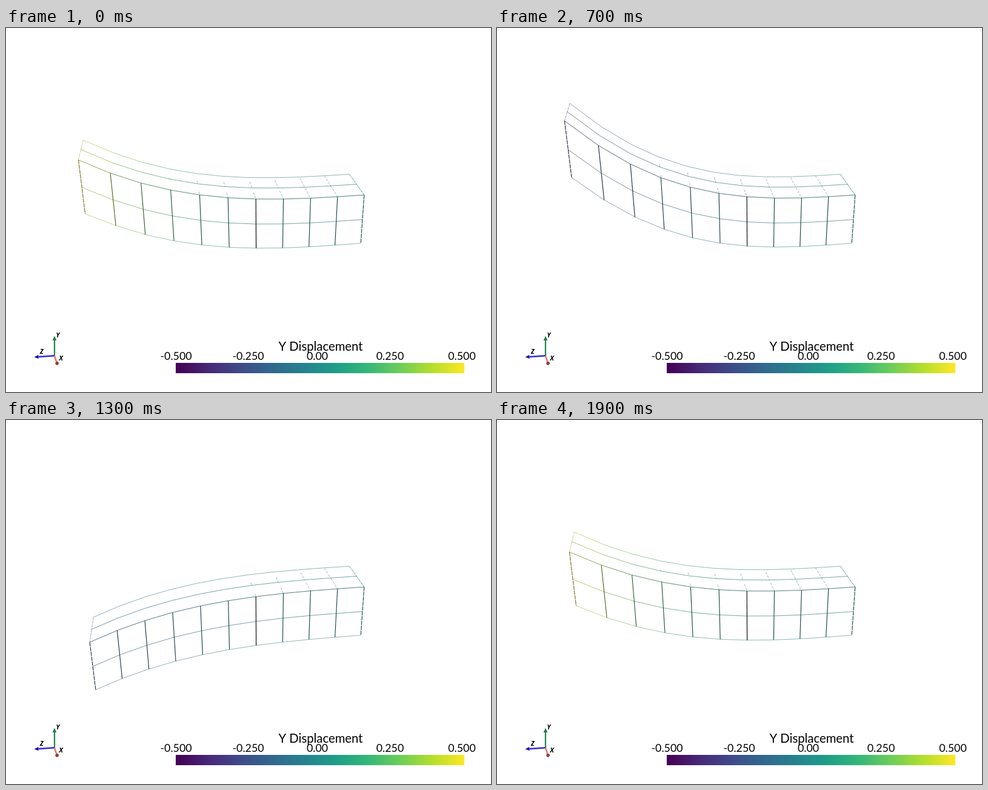
These frames come from a looping animation (800x600 px, 2000 ms). An HTML page with a canvas:

```html
<!DOCTYPE html>
<html lang="en">
<head>
<meta charset="utf-8">
<title>Beam displacement</title>
<style>
  html, body { margin: 0; width: 100%; height: 100%; overflow: hidden; background: #fff; }
  canvas { display: block; }
</style>
</head>
<body>
<canvas id="stage" width="800" height="600"></canvas>
<script>
const ctx = document.getElementById('stage').getContext('2d');
const STEPS = 20, STEP_MS = 100;
const CELLS = 10, LENGTH = 5;

// Camera: perspective with a 30 degree vertical view angle
const EYE = [11.915126, 6.113928, 3.612496];
const FOCUS = [0, 0.375, 2];
const FOCAL = 300 / Math.tan(Math.PI / 12);
const sub = (a, b) => a.map((v, i) => v - b[i]);
const dot = (a, b) => a[0] * b[0] + a[1] * b[1] + a[2] * b[2];
const cross = (a, b) => [
  a[1] * b[2] - a[2] * b[1],
  a[2] * b[0] - a[0] * b[2],
  a[0] * b[1] - a[1] * b[0]
];
const unit = a => a.map(v => v / Math.hypot(...a));
const forward = unit(sub(FOCUS, EYE));
const right = unit(cross(forward, [-0.425464, 0.902424, -0.067898]));
const up = cross(right, forward);

function project(p) {
  const r = sub(p, EYE), s = FOCAL / dot(r, forward);
  return [400 + dot(r, right) * s, 300 - dot(r, up) * s];
}

const VIRIDIS = [
  [68, 1, 84], [72, 40, 120], [62, 74, 137], [49, 104, 142], [38, 130, 142],
  [31, 158, 137], [53, 183, 121], [109, 205, 89], [180, 222, 44], [253, 231, 37]
];

// u runs from 0 to 1; shade below 1 darkens towards black
function viridis(u, shade = 1) {
  const f = Math.min(Math.max(u, 0), 1) * (VIRIDIS.length - 1);
  const i = Math.min(Math.floor(f), VIRIDIS.length - 2);
  const c = VIRIDIS[i].map((v, j) => Math.round((v + (VIRIDIS[i + 1][j] - v) * (f - i)) * shade));
  return `rgb(${c})`;
}

function line(a, b, color, width = 1, alpha = 1, dash = []) {
  ctx.globalAlpha = alpha;
  ctx.strokeStyle = color;
  ctx.lineWidth = width;
  ctx.setLineDash(dash);
  ctx.beginPath();
  ctx.moveTo(...a);
  ctx.lineTo(...b);
  ctx.stroke();
  ctx.globalAlpha = 1;
  ctx.setLineDash([]);
}

const shape = z => z ** 3 / 250;
const mix = (a, b, t) => a.map((v, i) => v + (b[i] - v) * t);

function drawBeam(step) {
  const phase = k => 2 * Math.PI * k / (STEPS - 1);
  const speed = Math.cos(phase(step));
  // Each step adds its displacement to the already bent beam
  let bend = 1;
  for (let k = 0; k <= step; k++) bend += Math.cos(phase(k));

  const at = (x, y, z) => project([x, y + bend * shape(z), z]);
  const tint = (z, shade) => viridis(0.5 + speed * shape(z), shade);

  // Lines along the beam
  for (let i = 0; i < CELLS; i++) {
    const z0 = i * LENGTH / CELLS, z1 = z0 + LENGTH / CELLS, zm = (z0 + z1) / 2;
    const along = (x, y, shade, alpha) =>
      line(at(x, y, z0), at(x, y, z1), tint(zm, shade), 0.9, alpha);
    along(0, 1, 0.75, 0.55);
    along(0.5, 1, 0.7, 0.65);
    along(1, 1, 0.55, 0.8);
    along(1, 0.5, 0.7, 0.65);
    along(1, 0, 0.75, 0.55);
  }

  // Lines across the top and down the front
  for (let i = 0; i <= CELLS; i++) {
    const z = i * LENGTH / CELLS, end = i === 0 || i === CELLS;
    const reach = end ? 1 : Math.min(1, 1.2 - 0.3 * z - 0.05 * z * (2 - Math.min(bend, 2.5)));
    if (reach > 0.1) {
      for (const x of [0, 0.5]) {
        const near = at(x + 0.5, 1, z);
        line(mix(near, at(x, 1, z), reach), near, tint(z, 0.65), 0.9,
          i === 0 ? 0.75 : 0.5, end ? [5, 1] : [4, 2]);
      }
    }
    const shade = z === 2 ? 0 : 0.45;
    line(at(1, 1, z), at(1, 0, z), tint(z, shade), 1.1, 1, end ? [7, 1] : []);
  }
}

function label(text, x, y, font, align = 'center') {
  ctx.font = font;
  ctx.textAlign = align;
  ctx.fillStyle = '#000';
  ctx.fillText(text, x, y);
}

function drawScale() {
  const x = 280, width = 476, colors = 256;
  for (let i = 0; i < width; i++) {
    ctx.fillStyle = viridis(Math.floor(i * colors / width) / (colors - 1));
    ctx.fillRect(x + i, 552, 1, 17);
  }
  label('Y Displacement', 519, 532, '20.3px Lato, sans-serif');
  const ticks = [['-0.500', 280.5], ['-0.250', 399.5], ['0.00', 513.5], ['0.250', 633.5], ['0.500', 752]];
  for (const [text, tx] of ticks) label(text, tx, 547, '17.8px Lato, sans-serif');
}

function arrow(from, to, color, tip, head, half) {
  const d = unit([to[0] - from[0], to[1] - from[1]]);
  const base = [to[0] - d[0] * head, to[1] - d[1] * head];
  line(from, base, color, 2.4);
  ctx.fillStyle = tip;
  ctx.beginPath();
  ctx.moveTo(...to);
  ctx.lineTo(base[0] - d[1] * half, base[1] + d[0] * half);
  ctx.lineTo(base[0] + d[1] * half, base[1] - d[0] * half);
  ctx.fill();
}

function drawAxes() {
  const origin = [80, 540.3];
  arrow(origin, [80, 507.5], '#2e8b57', '#267a4b', 7.5, 3.3);
  arrow(origin, [46.5, 542.4], '#2c2cd8', '#0b0bb0', 7, 3);
  line(origin, [83.6, 551.5], '#e8735c', 2.4);
  ctx.fillStyle = '#8c4038';
  ctx.beginPath();
  ctx.arc(84.2, 552.7, 2.8, 0, 2 * Math.PI);
  ctx.fill();
  const font = 'italic bold 10.5px "Open Sans", sans-serif';
  label('Y', 82.5, 510, font, 'left');
  label('Z', 56, 537, font, 'left');
  label('X', 87.5, 548, font, 'left');
}

function draw() {
  const step = Math.floor(performance.now() / STEP_MS) % STEPS;
  ctx.fillStyle = '#fff';
  ctx.fillRect(0, 0, 800, 600);
  drawBeam(step);
  drawScale();
  drawAxes();
  requestAnimationFrame(draw);
}
draw();
</script>
</body>
</html>
```
